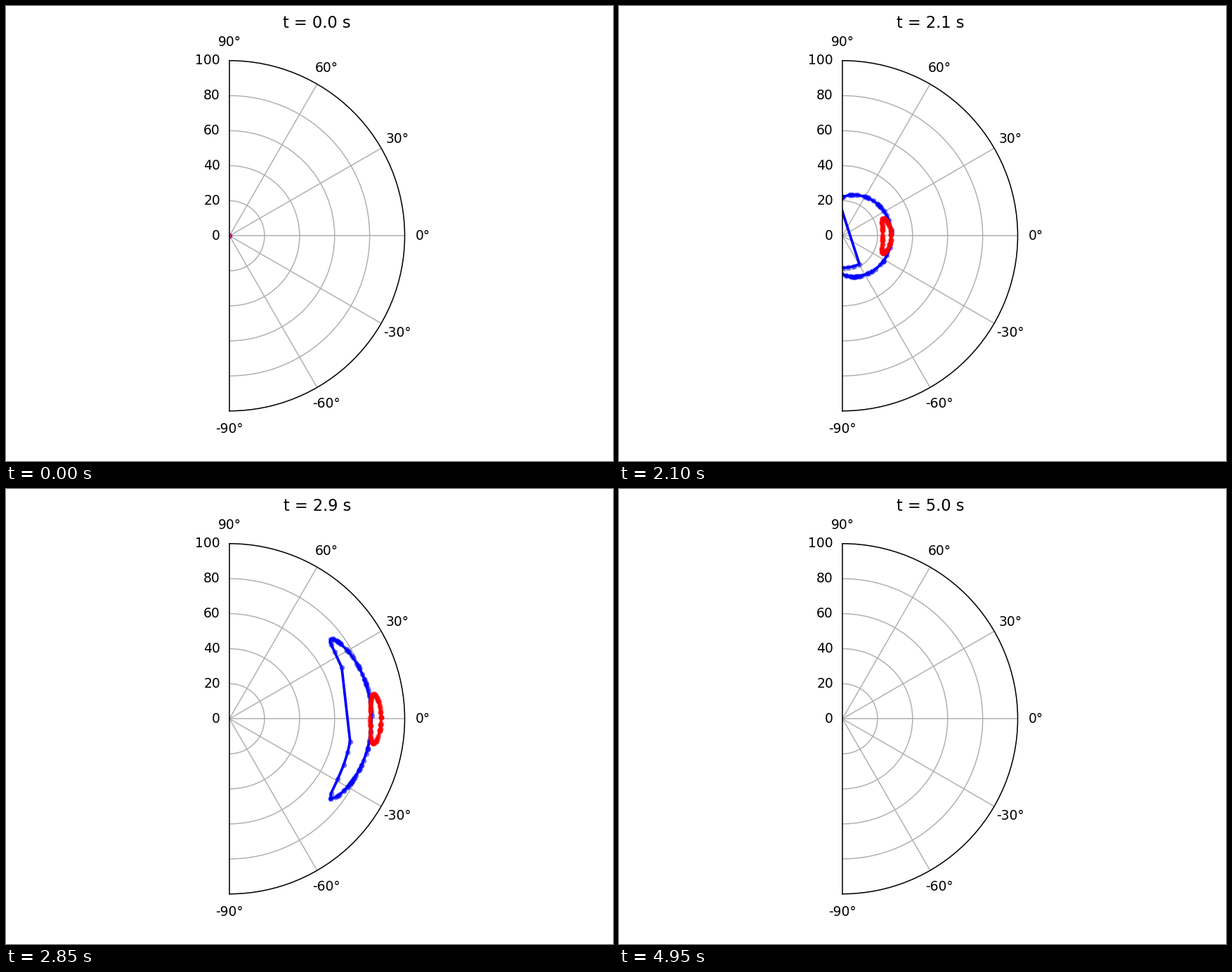
Animation, 864 px wide and 648 px high, one loop 5 s. Source, as a matplotlib script:

```python
import numpy as np
import matplotlib.pyplot as plt
from matplotlib.animation import FuncAnimation

FRAMES, FPS = 100, 20
BOW = 0.062  # how strongly the rings bend back away from the axis
rng = np.random.default_rng(7)


def radius(t, a, b, c):
    """Exponential growth whose rate falls off slowly."""
    return np.exp(a + b * t - c * t * t)


def close_ring(r0, depth, spread, t, front, back):
    """Flattened ring: u in [-1, 1] runs along the front, then the back."""
    u = np.concatenate([front, back, front[:1]])
    side = np.repeat([1, -1, 1], [len(front), len(back), 1])
    theta = spread * u
    half = depth / (1 + np.exp(-3 * (t - 1.75)))
    r = r0 * (1 - BOW * theta ** 2) + side * half * np.sqrt(1 - u ** 2)
    return theta, np.maximum(r, 0)


def random_side(n):
    return np.sin(np.sort(rng.uniform(-np.pi / 2, np.pi / 2, n)))


blue_front = np.sort(rng.choice([-1, 1], 64) * rng.uniform(0, 1, 64) ** 0.6)
blue_front = np.concatenate([[-1], blue_front, [1]])
upper_tail = 1 - 0.14 * 0.4 ** np.arange(3, -1, -1)
lower_tail = np.linspace(0.45, 0.97, 5)
red_front = random_side(48)
red_back = random_side(36)[::-1]


def blue_ring(t):
    # The tips drift at constant speed; the sparse rear closes on the axis.
    spread = np.arctan2(max(t - 1.37, 0), 2.68 * (t - 2.15))
    back = np.concatenate([upper_tail ** np.exp(2.7 * (t - 2.45)),
                           -lower_tail ** np.exp(1.175 * (t - 2.45))])
    return close_ring(radius(t, -1.297, 2.5655, 0.208), 5.8, spread, t,
                      blue_front, back)


def red_ring(t):
    r0 = radius(t, -2.168, 3.2976, 0.3455)
    spread = np.arcsin(np.clip(5.5 * (t - 0.3) / r0, 0, 1))
    return close_ring(r0, 3.2, spread, t, red_front, red_back)


fig = plt.figure(figsize=(6.4, 4.8), dpi=135)
ax = fig.add_subplot(projection="polar")
ax.set_thetamin(-90)
ax.set_thetamax(90)
ax.set_rlim(0, 100)
ax.set_xticks(np.radians(np.arange(-90, 91, 30)))
ax.set_yticks(np.arange(0, 101, 20))
ax.tick_params(axis="y", labelleft=False, labelright=True)
title = ax.set_title("t = 0.0 s")


def make_artists(color, z):
    dots = ax.scatter([], [], s=10, color=color, alpha=0.4, zorder=z)
    line, = ax.plot([], [], color=color, lw=2, zorder=z + 0.1)
    return dots, line


rings = [(blue_ring, *make_artists("blue", 2)),
         (red_ring, *make_artists("red", 2.2))]


def update(i):
    t = i / FPS
    title.set_text(f"t = {t:.1f} s")
    for ring, dots, line in rings:
        # Everything starts as a single point at the centre.
        theta, r = ring(t) if i else (np.zeros(1), np.zeros(1))
        dots.set_offsets(np.column_stack([theta, r]))
        line.set_data(theta, r)


anim = FuncAnimation(fig, update, frames=FRAMES, interval=1000 / FPS,
                     init_func=lambda: None, repeat=True, repeat_delay=0)
plt.show()
```
